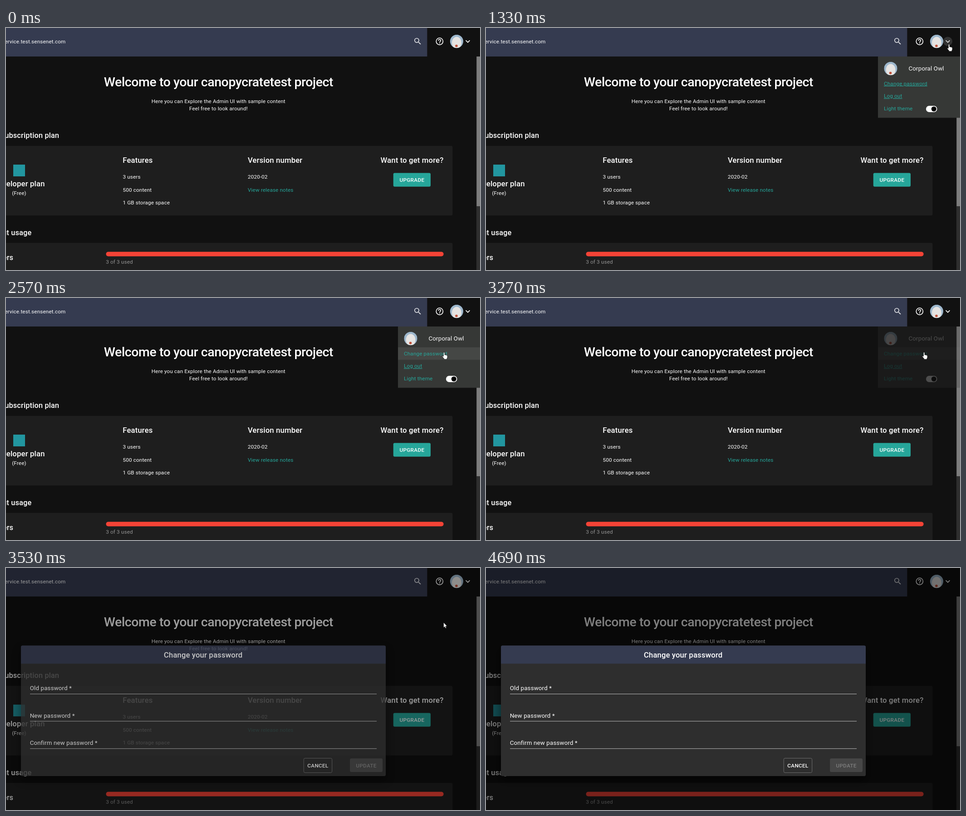
Recreate the animation shown at these times as an HTML page. Size 1046 by 535 pixels, loop 5600 ms.

```html
<!DOCTYPE html>
<html lang="en">
<head>
<meta charset="utf-8">
<title>Change password</title>
<style>
  html, body { margin: 0; width: 100%; height: 100%; overflow: hidden; background: #111; }
  svg { display: block; width: 100%; height: 100%; }
  text { font: 400 11.75px Roboto, sans-serif; letter-spacing: .0107em; fill: #fff; }
  .h4 { font-size: 28.55px; font-weight: 500; letter-spacing: -.0156em; }
  .h6 { font-size: 16.75px; font-weight: 500; letter-spacing: .0075em; }
  .section { font-size: 16.4px; text-anchor: end; }
  .body { font-size: 13.4px; letter-spacing: .0094em; }
  .btn { font-weight: 500; letter-spacing: .0286em; }
  .mid { text-anchor: middle; }
  .end { text-anchor: end; }
  .teal { fill: #26a69a; }
  .link { text-decoration: underline; }
</style>
</head>
<body>
<svg viewBox="0 0 1046 535" preserveAspectRatio="none">
  <defs>
    <filter id="soft" x="-10%" y="-20%" width="120%" height="150%">
      <feDropShadow dx="0" dy="9" stdDeviation="10" flood-color="#000" flood-opacity=".55"/>
    </filter>
    <clipPath id="round"><circle r="14.7"/></clipPath>
    <g id="avatar" clip-path="url(#round)">
      <circle r="14.7" fill="#9db7cc"/>
      <ellipse cy="3" rx="10.5" ry="13" fill="#e6e4e2"/>
      <circle cx="-.5" cy="10" r="2.8" fill="#c0523c"/>
    </g>
  </defs>

  <rect width="1046" height="535" fill="#111"/>
  <rect width="929.4" height="63" fill="#353b50"/>
  <text class="end" x="131.5" y="34">service.test.sensenet.com</text>
  <g fill="#fff">
    <path transform="translate(898.5 19.4) scale(.8375)" fill="#e4e5e9" d="M15.5 14h-.79l-.28-.27A6.47 6.47 0 0 0 16 9.5 6.5 6.5 0 1 0 9.5 16c1.61 0 3.09-.59 4.23-1.57l.27.28v.79l5 4.99L20.49 19zm-6 0a4.5 4.5 0 1 1 0-9 4.5 4.5 0 0 1 0 9z"/>
    <path transform="translate(946.8 19.5) scale(.8375)" d="M11 18h2v-2h-2zm1-16a10 10 0 1 0 0 20 10 10 0 0 0 0-20zm0 18a8 8 0 1 1 0-16 8 8 0 0 1 0 16zm0-14a4 4 0 0 0-4 4h2a2 2 0 1 1 4 0c0 2-3 1.75-3 5h2c0-2.25 3-2.5 3-5a4 4 0 0 0-4-4z"/>
    <circle id="halo" cx="1019" cy="29.6" r="10.2" opacity="0"/>
    <path id="chevron" transform="translate(1009 19.5) scale(.8375)" d="M7.41 8.59 12 13.17l4.59-4.58L18 10l-6 6-6-6z"/>
  </g>
  <use href="#avatar" x="994.5" y="29.5"/>

  <text class="h4 mid" x="469" y="129.3">Welcome to your canopycratetest project</text>
  <text class="mid" x="468.8" y="165.5">Here you can Explore the Admin UI with sample content</text>
  <text class="mid" x="468.8" y="182.3">Feel free to look around!</text>

  <text class="h6 section" x="117.3" y="243">Subscription plan</text>
  <rect x="-10" y="260.5" width="995.5" height="154" rx="3.5" fill="#1e1e1e"/>
  <rect x="16" y="302" width="26" height="26" fill="#2296a0"/>
  <text class="h6 mid" x="29" y="350">Developer plan</text>
  <text class="mid" x="29" y="369">(Free)</text>
  <text class="h6" x="257.5" y="298">Features</text>
  <text x="257.7" y="333">3 users</text>
  <text x="257.7" y="362">500 content</text>
  <text x="257.7" y="390">1 GB storage space</text>
  <text class="h6" x="533.5" y="298">Version number</text>
  <text x="533.5" y="333">2020-02</text>
  <text class="teal" x="533.5" y="362">View release notes</text>
  <text class="h6 mid" x="895.9" y="298">Want to get more?</text>
  <rect x="854.7" y="320.4" width="82.3" height="30.4" rx="3" fill="#26a69a"/>
  <text class="btn mid" x="895.9" y="340">UPGRADE</text>

  <text class="h6 section" x="56.3" y="457.5">Content usage</text>
  <rect x="-10" y="475" width="995.5" height="80" rx="3.5" fill="#1e1e1e"/>
  <text class="h6 section" x="16.2" y="512.5">Users</text>
  <rect x="220.7" y="494.8" width="745" height="10" rx="5" fill="#f44336"/>
  <text x="220.5" y="521" style="fill:#949494">3 of 3 used</text>

  <rect x="1038" y="63" width="8" height="472" fill="#2e2e2e"/>
  <rect x="1038.5" y="63" width="7.5" height="331" fill="#7c7c7c"/>

  <g id="menu" opacity="0">
    <rect x="865" y="63" width="181" height="135.5" fill="#363836"/>
    <rect id="row" x="865" y="109" width="181" height="27.5" fill="#454745"/>
    <use href="#avatar" x="893" y="89.5"/>
    <text class="body" x="932.5" y="94">Corporal Owl</text>
    <text id="change" class="teal link" x="878" y="126.7">Change password</text>
    <text class="teal link" x="878" y="154.3">Log out</text>
    <text class="teal" x="878" y="181.7">Light theme</text>
    <rect x="971" y="172" width="24.5" height="14" rx="7" fill="#fff"/>
    <circle cx="988.3" cy="179" r="5.5" fill="#000"/>
  </g>

  <rect id="shade" width="1046" height="535" opacity="0"/>
  <g id="dialog" opacity="0">
    <rect x="33" y="171.5" width="805" height="288.5" rx="3.5" fill="#2f2f2f" filter="url(#soft)"/>
    <path d="M33 211.5V175a3.5 3.5 0 0 1 3.5-3.5h798a3.5 3.5 0 0 1 3.5 3.5v36.5z" fill="#353b50"/>
    <text class="h6 mid" x="435" y="197.8">Change your password</text>
    <text class="body" x="52.7" y="270.3">Old password *</text>
    <text class="body" x="52.7" y="330.6">New password *</text>
    <text class="body" x="52.7" y="390.9">Confirm new password *</text>
    <path d="M53 278.5h765M53 338.7h765M53 399.3h765" stroke="#bcbcbc"/>
    <rect x="657" y="420.5" width="62.5" height="32" rx="3" fill="none" stroke="#6c6c6c"/>
    <text class="btn mid" x="688.3" y="440.5">CANCEL</text>
    <rect x="759" y="421" width="72" height="30" rx="3" fill="#464646"/>
    <text class="btn mid" x="795" y="440.5" style="fill:#7e7e7e">UPDATE</text>
  </g>

  <g id="cursor" fill="#fff" stroke="#111" stroke-width=".7" stroke-linejoin="round">
    <path id="arrow" d="M-.3-.5V10.8l2.5-2.3 1.6 3.8 1.9-.8-1.6-3.7h3.4z"/>
    <path id="hand" d="M-.6.3a1.3 1.3 0 0 1 2.6 0V4.8q1.2-.8 2.1.3 1.2-.6 2 .5 2-.4 2 1.6V10q0 1.7-1.2 2.9v1.5H.6V13.100q-1.500-1.600-3.900-5 .2-1.800 2.700-.1z"/>
  </g>
</svg>
<script>
const LOOP = 5600;
const $ = id => document.getElementById(id);
const set = (id, attr, v) => $(id).setAttribute(attr, v);
const show = (id, on) => { $(id).style.display = on ? '' : 'none'; };

const easeOut = p => 1 - (1 - p) ** 2;
const easeIn = p => p * p;
const easeBoth = p => p * p * (3 - 2 * p);

// Pointer moves: start, end, number of steps, from, to, easing
const moves = [
  [70, 630, 9, [973, 635], [1025, 43], easeOut],
  [710, 940, 4, [1025, 43], [1021, 37], easeOut],
  [1720, 2260, 8, [1021, 36.5], [972, 114], easeBoth],
  [2340, 2570, 4, [972, 114], [966, 121], easeOut],
  [4290, 4690, 6, [966, 121], [1071, 700], easeIn]
];

function stepped(t, start, end, n) {
  if (t < start) return 0;
  const k = Math.floor((t - start) / (end - start) * (n - 1) + 1e-6) + 1;
  return Math.min(k, n) / n;
}

function pointer(t) {
  let pos = moves[0][3];
  for (const [start, end, n, from, to, ease] of moves) {
    if (t < start) break;
    const p = ease(stepped(t, start, end, n));
    pos = from.map((v, i) => v + (to[i] - v) * p);
  }
  return pos;
}

// Last value whose time has passed
const hold = (keys, t) => keys.reduce((v, [at, next]) => t >= at ? next : v, 0);

const menuFade = [[1100, .3], [1180, .75], [1250, 1], [3200, .7], [3270, .25], [3350, 0]];
const dialogFade = [[3430, .16], [3530, .77], [3610, .96], [3680, 1]];

function draw(t) {
  const [x, y] = pointer(t);
  const open = hold(menuFade, t), dialog = hold(dialogFade, t);
  const onIcon = t >= 790 && Math.hypot(x - 1019, y - 29.7) < 11;
  const onRow = open > 0 && y >= 109 && y < 137;
  const pressed = t >= 1100 && t < 1640;

  set('cursor', 'transform', `translate(${x.toFixed(2)} ${y.toFixed(2)})`);
  show('arrow', !onIcon && !onRow);
  show('hand', onIcon || onRow);

  set('halo', 'opacity', onIcon ? (pressed ? .14 : .1) : 0);
  set('chevron', 'opacity', pressed ? .8 : 1);

  set('menu', 'opacity', open);
  show('row', onRow);
  $('change').classList.toggle('link', !onRow);

  set('shade', 'opacity', dialog * .5);
  set('dialog', 'opacity', dialog);
}

function tick() {
  draw(performance.now() % LOOP);
  requestAnimationFrame(tick);
}
tick();
</script>
</body>
</html>
```
